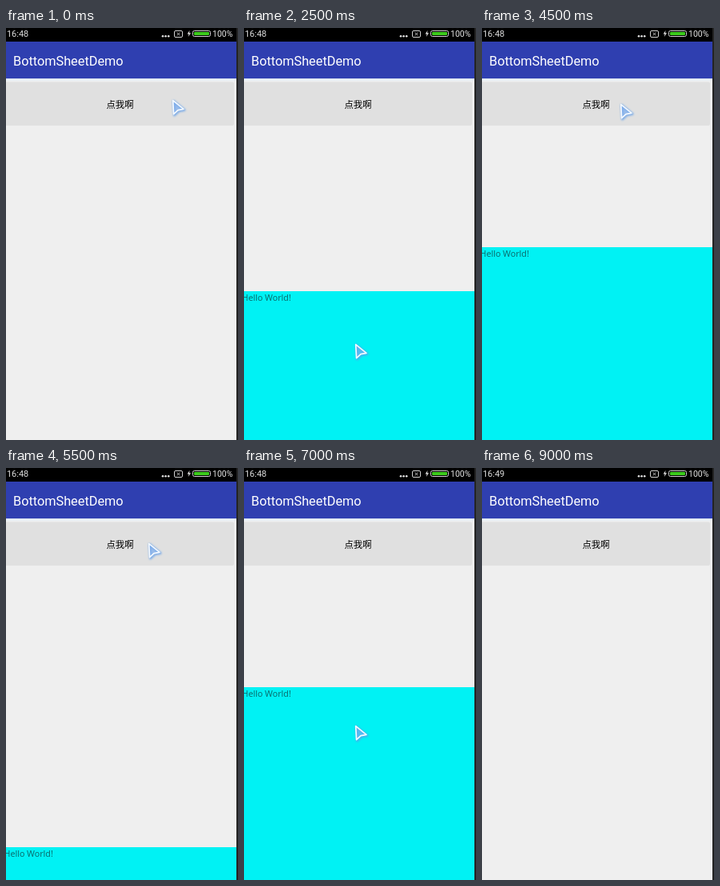
These frames come from a looping animation (290 px wide and 515 px high, 9.5 s). An HTML page:

```html
<!DOCTYPE html>
<html lang="zh">
<head>
<meta charset="utf-8">
<title>Bottom sheet</title>
<style>
  html, body { margin: 0; width: 100%; height: 100%; overflow: hidden; background: #efefef; }
  svg { display: block; width: 290px; height: 515px; }
  text { font-family: Roboto, sans-serif; }
  #label { font: 500 11.4px "Noto Sans CJK SC", "Noto Sans CJK", sans-serif; }
  #sheet text { font: 10.65px "Noto Sans", sans-serif; }
</style>
</head>
<body>
<svg viewBox="0 0 290 515">
  <defs>
    <linearGradient id="rim" x1="0" y1="0" x2="0" y2="1">
      <stop offset="0" stop-color="#c9d3ea"/>
      <stop offset=".4" stop-color="#eaf3f8"/>
      <stop offset="1" stop-color="#efefef"/>
    </linearGradient>
    <filter id="soft" x="-30%" y="-30%" width="160%" height="160%">
      <feGaussianBlur stdDeviation=".8"/>
    </filter>
  </defs>

  <rect width="290" height="515" fill="#efefef"/>
  <rect y="63" width="290" height="4" fill="url(#rim)"/>
  <rect y="17" width="290" height="46" fill="#2f3fb0"/>
  <text x="9" y="46.5" font-size="16.3" fill="#fff">BottomSheetDemo</text>

  <rect id="button" x="-3" y="67.5" width="288" height="54.5" rx="2"/>
  <text id="label" x="142.5" y="100" text-anchor="middle">点我啊</text>

  <g id="sheet">
    <rect width="290" height="515" fill="#00f2f4"/>
    <text x="-2.5" y="12" fill="#0a6f70">Hello World!</text>
  </g>

  <rect width="290" height="17" fill="#000"/>
  <g fill="#e2e2e2">
    <text id="clock" x="1" y="11.3" font-size="10.9"></text>
    <text x="258" y="11" font-size="10.5">100%</text>
    <circle cx="196" cy="10.3" r="1.3"/>
    <circle cx="199.6" cy="10.3" r="1.3"/>
    <circle cx="203.2" cy="10.3" r="1.3"/>
    <path d="M229.6 3L226.6 7.6H228.6L227.8 11L231 6.2H229Z"/>
  </g>
  <g fill="none" stroke="#d0d0d0">
    <rect x="210.5" y="3.5" width="10" height="8" rx="1.5"/>
    <path d="M213.8 5.8l3.4 3.4m0-3.4l-3.4 3.4"/>
    <rect x="233.5" y="3.5" width="22" height="7" rx="2"/>
  </g>
  <rect x="235" y="5" width="19" height="4" rx="1" fill="#3ccb1c"/>
  <rect x="288" width="2" height="515" fill="#242424"/>

  <g id="cursor" stroke-linejoin="round">
    <path d="M2.5 2.5L16 13.5L9 14.8L3.5 20Z" fill="none" stroke="#5c9be8" stroke-opacity=".75" stroke-width="3" filter="url(#soft)"/>
    <path d="M1.7 1.7L15 12.3L8 13.6L2.6 18.6Z" fill="#74a9ee" fill-opacity=".65" stroke="#f4f9ff" stroke-width="1.7"/>
  </g>
</svg>
<script>
  const STEP = 500, HIDDEN = 515;

  // sheet top, cursor x, cursor y, button pressed
  const steps = [
    [HIDDEN, 207, 89, 0],
    [HIDDEN, 191, 89, 1],
    [273, 190, 89, 0],
    [272, 167, 148, 0],
    [272, 147, 335, 0],
    [329, 138, 394, 0],
    [395, 138, 457, 0],
    [HIDDEN, 163, 141, 0],
    [HIDDEN, 165, 94, 0],
    [274, 172, 94, 0],
    [272, 177, 93, 0],
    [474, 177, 93, 0],
    [HIDDEN, 177, 93, 0],
    [HIDDEN, 170, 126, 1],
    [274, 138, 321, 0],
    [280, 138, 402, 0],
    [411, 138, 478, 0],
    [482, 138, 492, 0],
    [HIDDEN, 138, 540, 0]
  ];
  const MINUTE_STEP = 15;

  const [button, sheet, clock, cursor] =
    ["button", "sheet", "clock", "cursor"].map(id => document.getElementById(id));
  const move = (el, x, y) => el.setAttribute("transform", `translate(${x} ${y})`);

  let shown = -1;
  function draw(now) {
    const i = Math.floor(now / STEP) % steps.length;
    if (i !== shown) {
      const [top, x, y, pressed] = steps[shown = i];
      move(sheet, 0, top);
      move(cursor, x, y);
      button.setAttribute("fill", pressed ? "#cecece" : "#e0e0e0");
      clock.textContent = i < MINUTE_STEP ? "16:48" : "16:49";
    }
  }

  const start = performance.now();
  function tick() {
    draw(performance.now() - start);
    requestAnimationFrame(tick);
  }
  tick();
</script>
</body>
</html>
```
